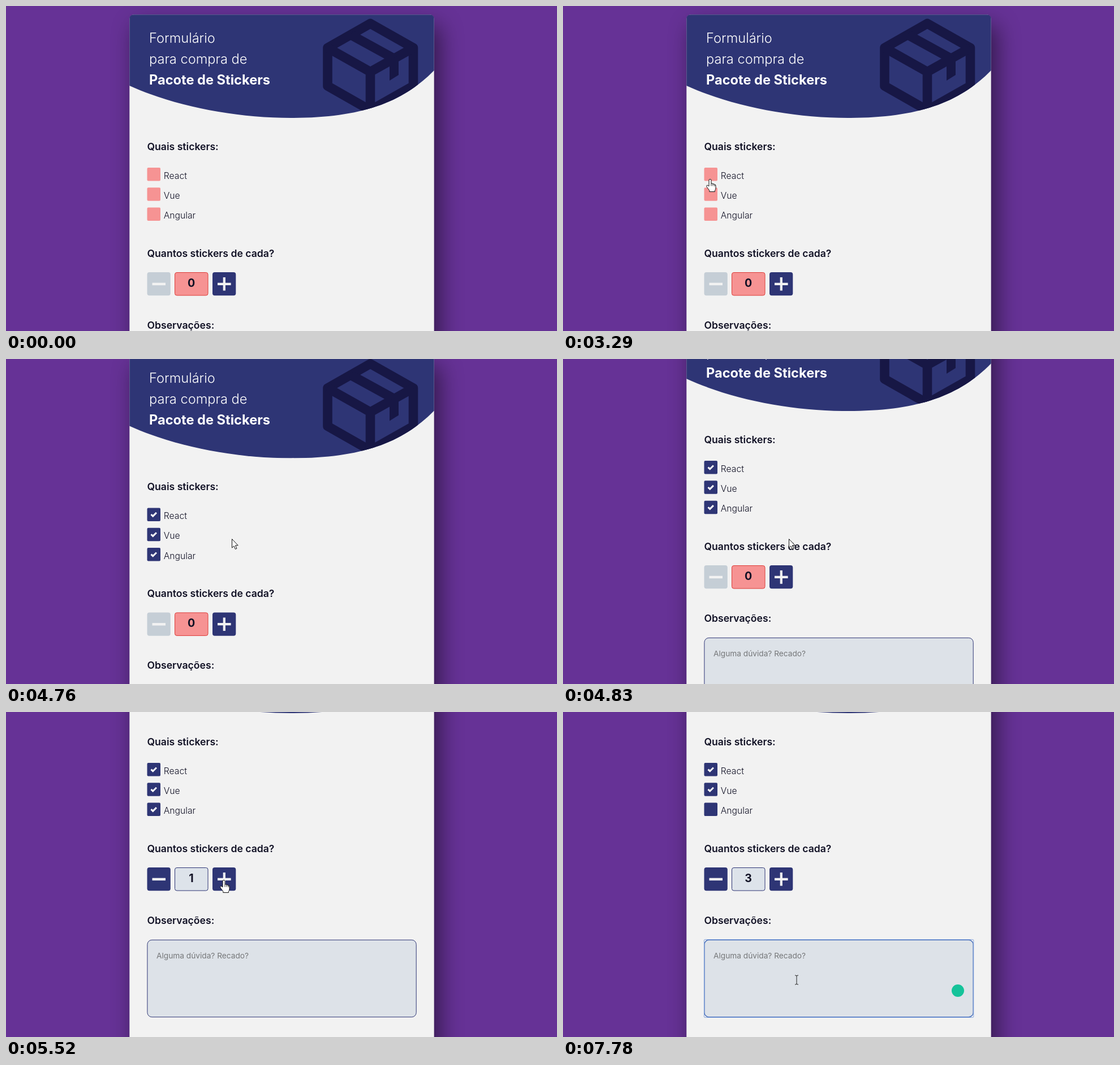
Recreate the animation shown at these times as an HTML page. Size 974 px wide and 575 px high, loop 8 s.

```html
<!DOCTYPE html>
<html lang="pt-BR">
<head>
<meta charset="utf-8">
<title>Formulário</title>
<style>
  html, body { margin: 0; width: 100%; height: 100%; overflow: hidden; background: #663296; }
  svg { display: block; width: 974px; height: 575px; font-family: Inter, "Liberation Sans", sans-serif; }
  .title { font-size: 23.6px; font-weight: 300; fill: #fff; }
  .bold { font-weight: 700; }
  .head { font-size: 17.6px; font-weight: 600; fill: #111125; }
  .label { font-size: 15.7px; font-weight: 300; fill: #111125; }
  .count { font-size: 19.6px; font-weight: 700; fill: #111125; text-anchor: middle; }
  .hint { font-size: 13.7px; font-weight: 400; fill: #757779; }
  .cursor { fill: #fff; stroke: #111; stroke-width: 1; stroke-linejoin: round; }
</style>
</head>
<body>
<svg viewBox="0 0 974 575" xmlns="http://www.w3.org/2000/svg">
  <defs>
    <filter id="blur" filterUnits="userSpaceOnUse" x="100" y="-80" width="800" height="1200">
      <feGaussianBlur stdDeviation="20"/>
    </filter>
    <clipPath id="banner">
      <path d="M218.3 141V23Q218.3 15.2 226 15.2H749Q756.7 15.2 756.7 23V114C700 172 625 198 504 198C405 198 300 178 218.3 141Z"/>
    </clipPath>
  </defs>
  <rect width="974" height="575" fill="#663296"/>

  <g id="page">
    <rect x="228" y="34" width="539" height="900" rx="8" opacity=".5" filter="url(#blur)"/>
    <rect x="218.3" y="15.2" width="538.4" height="900" rx="8" fill="#f2f2f2"/>

    <g clip-path="url(#banner)">
      <rect x="218" y="15" width="539" height="190" fill="#2e3575"/>
      <g fill="none" stroke="#171745" stroke-width="16.6" stroke-linejoin="round">
        <path d="M644 31L720 74V141.5L644 184.5L568.5 141.5V74Z"/>
        <path d="M568.5 74L644 116.5L720 74M644 116.5V184.5M609.5 51L686 93"/>
      </g>
      <path d="M678 96L694 88V122L678 132Z" fill="#171745"/>
    </g>
    <text class="title" x="253" y="65">Formulário</text>
    <text class="title" x="253" y="102">para compra de</text>
    <text class="title bold" x="253" y="139">Pacote de Stickers</text>

    <text class="head" x="249.5" y="255">Quais stickers:</text>
    <g id="options"></g>

    <text class="head" x="249.5" y="444">Quantos stickers de cada?</text>
    <rect id="minus" x="249.5" y="471" width="41.3" height="41.3" rx="4"/>
    <rect x="258.5" y="489.7" width="23.5" height="4.4" fill="#f2f2f2"/>
    <rect id="field" x="298.5" y="471.5" width="58.5" height="40.5" rx="3.5"/>
    <text id="count" class="count" x="327.5" y="497">0</text>
    <rect x="365" y="471" width="41.3" height="41.3" rx="4" fill="#2e3575"/>
    <path d="M374 491.8H397.6M385.8 480V503.6" stroke="#f2f2f2" stroke-width="4.2"/>

    <text class="head" x="249.5" y="571">Observações:</text>
    <rect id="notes" x="249.9" y="599.3" width="475.3" height="136.4" rx="8" fill="#dde2e8"/>
    <rect id="ring" x="249.4" y="598.6" width="476.4" height="137.8" rx="1.5" fill="none" stroke="#86a5dc"/>
    <text class="hint" x="266" y="632">Alguma dúvida? Recado?</text>
    <rect id="caret" x="266" y="619" width="1" height="17" fill="#111"/>
    <circle id="badge" cx="698" cy="689" r="11" fill="#15c39a"/>
  </g>

  <g id="cursor">
    <path id="arrow" class="cursor" d="M.5 .5V16L4 12.8L6.4 18.4L8.9 17.3L6.5 11.8H11.2Z"/>
    <g id="hand">
      <path class="cursor" d="M-2 12.5V2.3Q-2 .5 0 .5Q2 .5 2 2.3V8Q4.8 7.2 5 9Q7.6 8.2 8 10Q10 9.5 10 12V16Q10 19 8.4 20.3V22.5H-1.2V20.3L-5.4 14.8Q-7.2 12 -5.6 11.2Q-4 10.6 -2 13Z"/>
      <path d="M2 8V12.5M5 9V12.5M8 10V13" fill="none" stroke="#111" stroke-width=".9"/>
    </g>
    <path id="beam" d="M-3 -8H-1L0 -7L1 -8H3M0 -7V7M-3 8H-1L0 7L1 8H3" fill="none" stroke="#222"/>
  </g>
</svg>
<script>
const LOOP = 8000, START = 670, STEP = 77.28, NAVY = "#2e3575";
const $ = id => document.getElementById(id);

const options = [
  { name: "React", clicks: [1450, 2220, 3400] },
  { name: "Vue", clicks: [3990] },
  { name: "Angular", clicks: [4375, 6380] }
];
const plusClicks = [5520, 5670, 5920];

// Each glide of the pointer ends at x, y with the given shape.
const glides = [
  { from: 670, to: 1070, x: 260, y: 300, shape: "hand" },
  { from: 2370, to: 2680, x: 322, y: 316, shape: "arrow" },
  { from: 2830, to: 3140, x: 260, y: 306, shape: "hand" },
  { from: 3450, to: 3700, x: 260, y: 338, shape: "hand" },
  { from: 4070, to: 4300, x: 260, y: 354, shape: "hand" },
  { from: 4450, to: 4720, x: 399, y: 318, shape: "arrow" },
  { from: 4840, to: 5200, x: 385, y: 297, shape: "hand" },
  { from: 5920, to: 6300, x: 260, y: 170, shape: "hand" },
  { from: 6600, to: 7080, x: 413, y: 474, shape: "beam" }
];

const svg = (tag, attrs, parent) => {
  const el = document.createElementNS("http://www.w3.org/2000/svg", tag);
  for (const k in attrs) el.setAttribute(k, attrs[k]);
  return parent.appendChild(el);
};

options.forEach((o, i) => {
  const g = svg("g", { transform: `translate(249.5 ${286 + i * 35.3})` }, $("options"));
  o.box = svg("rect", { width: 23.5, height: 23.5, rx: 2 }, g);
  o.check = svg("path", { d: "M7 11.6L10.2 14.7L16.4 8.5", fill: "none", stroke: "#fff", "stroke-width": 3 }, g);
  svg("text", { class: "label", x: 29.3, y: 19.6 }, g).textContent = o.name;
});

// Smooth rise from 0 to 1 between two times.
function rise(t, from, to) {
  const p = Math.min(1, Math.max(0, (t - from) / (to - from)));
  return p * p * (3 - 2 * p);
}

// The screen refreshes at a steady low rate.
const tick = t => START + STEP * Math.floor((t - START + 20) / STEP);

// Every click turns the box over: on, off, on.
const level = (clicks, t) =>
  clicks.reduce((sum, c, i) => sum + (i % 2 ? -1 : 1) * rise(t, c - 80, c + 70), 0);

function pointer(t) {
  const p = { x: 800, y: 496, shape: "arrow" };
  for (const g of glides) {
    const k = rise(t, g.from, g.to);
    p.x += (g.x - p.x) * k;
    p.y += (g.y - p.y) * k;
    if (k > 0.7) p.shape = g.shape;
    else if (k > 0.2) p.shape = "arrow";
  }
  return p;
}

const mix = (a, b, k) => `rgb(${a.map((v, i) => Math.round(v + (b[i] - v) * k))})`;
const show = (el, on) => el.setAttribute("visibility", on ? "visible" : "hidden");

function draw(time) {
  const t = tick(time);
  $("page").setAttribute("transform", `translate(0 ${-196 * rise(t, 4714, 4959)})`);

  const levels = options.map(o => level(o.clicks, t));
  const valid = Math.max(...levels);
  options.forEach((o, i) => {
    o.box.setAttribute("fill", mix([246, 147, 147], [46, 53, 117], valid));
    o.check.setAttribute("opacity", levels[i]);
  });

  const count = plusClicks.filter(c => t >= c).length;
  $("count").textContent = count;
  $("minus").setAttribute("fill", count ? NAVY : "#c5ced6");
  $("field").setAttribute("fill", count ? "#dde3ea" : "#f69393");
  $("field").setAttribute("stroke", count ? NAVY : "#dc3c38");

  const focus = time >= 7230;
  $("notes").setAttribute("stroke", focus ? "#3f68b8" : NAVY);
  $("notes").setAttribute("stroke-width", focus ? 1.4 : 1);
  show($("ring"), focus);
  show($("caret"), focus && time < 7780);
  show($("badge"), time >= 7460);

  const p = pointer(t);
  for (const shape of ["arrow", "hand", "beam"]) show($(shape), t >= START && p.shape === shape);
  $("cursor").setAttribute("transform", `translate(${p.x} ${p.y})`);
}

const begin = performance.now();
function frame() {
  draw((performance.now() - begin) % LOOP);
  requestAnimationFrame(frame);
}
frame();
</script>
</body>
</html>
```
